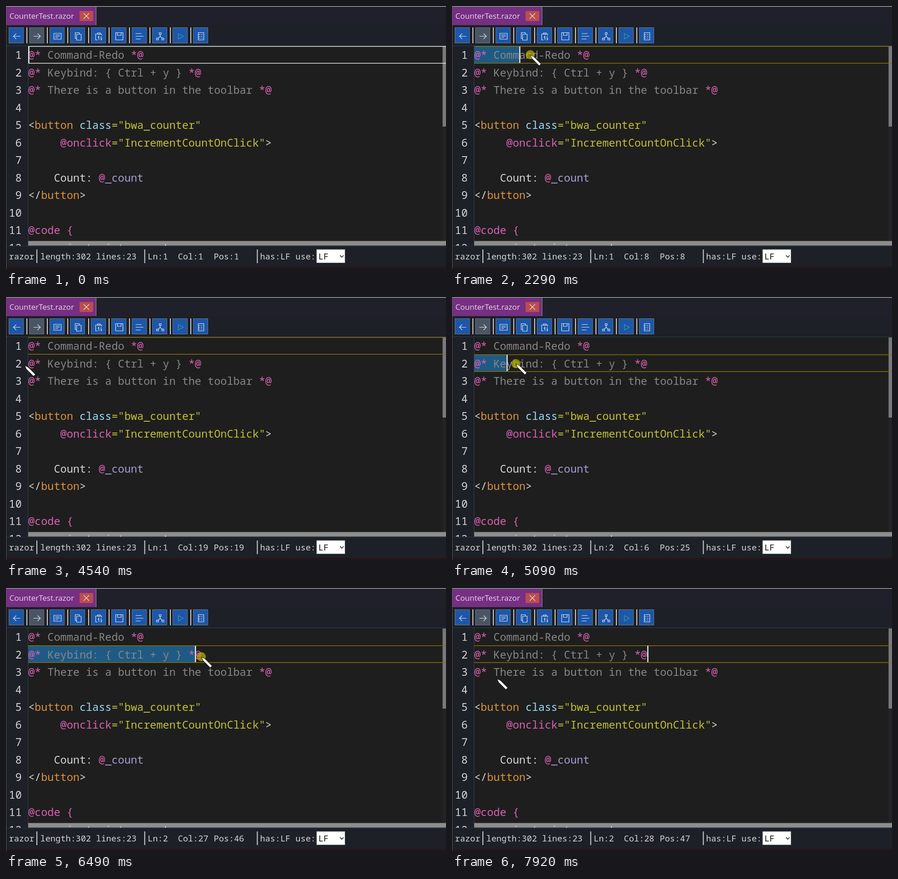
Animation, 969 px wide and 578 px high, one loop 7.99 s. Source, as an HTML page with a canvas:

```html
<!DOCTYPE html>
<html lang="en">
<head>
<meta charset="utf-8">
<title>Editor</title>
<style>
html, body { margin: 0; width: 100%; height: 100%; overflow: hidden; background: #1e1e1e; }
canvas { display: block; width: 969px; height: 578px; }
</style>
</head>
<body>
<canvas id="stage" width="969" height="578"></canvas>
<script>
const ctx = document.getElementById('stage').getContext('2d');
const LOOP = 7990, LEFT = 49, CHAR = 14.11, ROW = 38.5;
const MONO = '"Noto Sans Mono", "DejaVu Sans Mono", monospace';
const CODE_FONT = '23.52px ' + MONO;
const STATUS_FONT = '18.6px ' + MONO;
const TAB_FONT = '17.06px "Open Sans", "Noto Sans", sans-serif';
const PINK = '#da62b2', GRAY = '#878787', WHITE = '#d6d6d6',
      ORANGE = '#dc923e', SKY = '#9cdcfe', OLIVE = '#c3c136', LILAC = '#a99bd6';

// Each line: pairs of text and colour.
const comment = text => [['@*', PINK], [` ${text} `, GRAY], ['*@', PINK]];
const LINES = [
  comment('Command-Redo'),
  comment('Keybind: { Ctrl + y }'),
  comment('There is a button in the toolbar'),
  [],
  [['<', WHITE], ['button', ORANGE], [' class', SKY], ['="bwa_counter"', OLIVE]],
  [['     @onclick', PINK], ['="IncrementCountOnClick"', OLIVE], ['>', WHITE]],
  [],
  [['    Count: ', WHITE], ['@', PINK], ['_count', LILAC]],
  [['</', WHITE], ['button', ORANGE], ['>', WHITE]],
  [],
  [['@code {', PINK]],
  [['    private int', '#d8bd92'], [' _count;', WHITE]]
];
const lineLength = row => LINES[row].reduce((n, [s]) => n + s.length, 0);

// Moments of the two drags and the click after each.
const FIRST = { press: 1690, release: 3190, clear: 3390, lift: 3600 };
const SECOND = { press: 4690, release: 6900, clear: 7100, lift: 7240 };

// Pointer stops, joined by straight moves.
const STOPS = [
  { t: 390, x: 880, y: 562 }, { t: 1150, x: 110, y: 109 },
  { t: FIRST.press, x: 36, y: 108 }, { t: 1940, x: 36, y: 108 },
  { t: 2290, x: 172, y: 107 }, { t: 2850, x: 328, y: 116 },
  { t: FIRST.release, x: 342, y: 114 }, { t: 3670, x: 342, y: 114 },
  { t: 4300, x: 95, y: 165 }, { t: 4540, x: 41, y: 150 },
  { t: 4830, x: 40, y: 148 }, { t: 5560, x: 322, y: 144 },
  { t: 6490, x: 430, y: 151 }, { t: SECOND.release, x: 475, y: 152 },
  { t: SECOND.clear, x: 475, y: 152 }, { t: 7920, x: 99, y: 199 }
];

function pointerAt(t) {
  const i = STOPS.findIndex(s => s.t > t);
  if (i < 1) return i ? STOPS[STOPS.length - 1] : STOPS[0];
  const a = STOPS[i - 1], b = STOPS[i], k = (t - a.t) / (b.t - a.t);
  return { x: a.x + (b.x - a.x) * k, y: a.y + (b.y - a.y) * k };
}

// The caret trails the pointer during a drag and stays put afterwards.
function stateAt(t) {
  const drag = t < SECOND.press ? FIRST : SECOND;
  const row = drag === FIRST ? 0 : 1;
  const reach = pointerAt(Math.min(t, drag.release)).x - 69.5;
  const col = t < drag.press ? 0 : Math.max(0, Math.min(lineLength(row), Math.round(reach / CHAR)));
  const selecting = t >= drag.press && t < drag.clear;
  const pressed = t >= drag.press && t < drag.release || t >= drag.clear && t < drag.lift;
  const idle = t < FIRST.press ? t % 1000 >= 190 && t % 1000 < 690 : t > 3930 && t < SECOND.press;
  return { row, col, selecting, pressed, caret: !idle, clicked: t >= FIRST.press };
}

function rect(x, y, w, h, color) {
  ctx.fillStyle = color;
  ctx.fillRect(x, y, w, h);
}

function text(s, x, y, color, font) {
  ctx.font = font;
  ctx.fillStyle = color;
  ctx.fillText(s, x, y);
}

function line(...p) {
  ctx.moveTo(p[0], p[1]);
  for (let i = 2; i < p.length; i += 2) ctx.lineTo(p[i], p[i + 1]);
}

// Box centred on x, y.
const box = (x, y, w, h) => ctx.rect(x - w / 2, y - h / 2, w, h);

function bars(x, gap, ...widths) {
  widths.forEach((w, i) => line(x, (i - 1) * gap, x + w, (i - 1) * gap));
}

function arrow(dir) {
  line(-8, 0, 8, 0);
  line(dir, -6, dir * 7, 0, dir, 6);
}

const ICONS = [
  () => arrow(-1),
  () => arrow(1),
  () => { box(0, 0, 16, 13); bars(-5, 3, 10, 10, 6); },
  () => { box(2, 2, 10, 13); line(-3, 5, -6, 5, -6, -8, 3, -8, 3, -5); },
  () => {
    line(-3, 8, -7, 8, -7, -5, 6, -5, 6, -2);
    box(0, -6, 6, 3);
    line(0, 8, 0, 0, -2, 3);
    line(5, 0, 5, 8, 7, 5);
  },
  () => { box(0, 0, 16, 16); box(0, -5, 8, 6); },
  () => bars(-9, 6, 13, 17, 11),
  () => {
    line(-5, 5, 0, 0, 5, 5);
    line(0, 0, 0, -4);
    for (const x of [-6, 0, 6]) box(x, x ? 6 : -6, 4, 4);
  },
  () => line(-5, -6, 6, 0, -5, 6, -5, -6),
  () => { box(0, 0, 12, 16); bars(-6, 4, 4, 4, 4); bars(0, 4, 3, 3, 3); }
];

function strokeAt(x, y, color, shape, width = 1.2) {
  ctx.save();
  ctx.translate(x, y);
  ctx.strokeStyle = color;
  ctx.lineWidth = width;
  ctx.beginPath();
  shape();
  ctx.stroke();
  ctx.restore();
}

function drawHeader() {
  rect(0, 0, 969, 43, '#1f2029');
  rect(0, 43, 969, 45, '#1d2027');
  rect(1, 2, 197, 40, '#762f82');
  rect(198, 2, 1, 40, '#a08ba5');
  text('CounterTest.razor', 7.5, 28, '#e6d8e9', TAB_FONT);
  rect(162, 11, 30, 22, '#b94e4e');
  strokeAt(177, 22, '#f0e4e4', () => { line(-6, -6, 6, 6); line(6, -6, -6, 6); });
  ICONS.forEach((icon, i) => {
    const x = Math.round(23 + 45.15 * i);
    const disabled = i === 1;
    rect(x - 17, 47, 33, 35, disabled ? '#65707c' : '#767676');
    rect(x - 16, 48, 31, 33, disabled ? '#4a5564' : '#1c57a9');
    strokeAt(x + .5, 66.5, i === 8 ? '#3f9c9c' : '#e2e8ef', icon);
    if (i) rect(x - 23, 47, 2, 35, '#d2d2d2');
  });
  rect(0, 87, 969, 1, '#2b414e');
}

function drawCode() {
  ctx.save();
  ctx.beginPath();
  ctx.rect(0, 88, 969, 439);
  ctx.clip();
  LINES.forEach((parts, n) => {
    const y = 116 + n * ROW;
    const label = String(n + 1);
    text(label, 34.5 - label.length * CHAR, y, WHITE, CODE_FONT);
    let x = LEFT;
    for (const [s, color] of parts) {
      text(s, x, y, color, CODE_FONT);
      x += s.length * CHAR;
    }
  });
  ctx.restore();
}

function drawEditor({ row, col, selecting, caret, clicked }) {
  rect(0, 88, 969, 439, '#1e1e1e');
  rect(0, 88, 48, 439, '#1d2027');
  rect(48, 88, 1, 439, '#2b4656');
  rect(961.5, 89, 7.5, 428, '#242424');
  rect(961.5, 89, 7.5, 176, '#797979');
  rect(LEFT, 516.5, 920, 10, '#8d8d8d');

  const top = 89 + row * 38;
  const edge = clicked ? '#8b7208' : '#e4e4e4';
  if (selecting) rect(LEFT, top, col * CHAR, 36, '#1f5a84');
  for (const y of [top - 1, top + 36]) rect(LEFT, y, 920, 1.5, edge);
  drawCode();
  if (caret) rect(Math.round(LEFT + col * CHAR), top, 2.5, 36, '#ececec');
}

function drawStatus({ row, col }) {
  const put = (s, x, color = WHITE) => text(s, x, 556.5, color, STATUS_FONT);
  rect(0, 527, 969, 51, '#1d2127');
  rect(0, 527, 969, 1, '#26343e');
  rect(0, 573.5, 969, 4.5, '#24151a');
  put('razor', 6.5);
  put('length:302 lines:23', 75.5);
  put('Ln:' + (row + 1), 312);
  put('Col:' + (col + 1), 378.5);
  put('Pos:' + (row * (lineLength(0) + 1) + col + 1), 457.5);
  put('has:LF use:', 559.5);
  for (const x of [67, 304.5, 552.5]) rect(x, 535, 2, 30, '#d2d2d2');
  rect(683.5, 534.5, 63.5, 30.5, '#767676');
  rect(684.5, 535.5, 61.5, 28.5, '#ffffff');
  put('LF', 688, '#111111');
  strokeAt(739.5, 550, '#222222', () => line(-4, -2, 0, 2, 4, -2), 1.7);
}

function drawPointer({ x, y }, pressed) {
  if (pressed) {
    ctx.fillStyle = 'rgba(190, 180, 0, .7)';
    ctx.beginPath();
    ctx.arc(x, y, 10, 0, Math.PI * 2);
    ctx.fill();
  }
  ctx.save();
  ctx.translate(x + 1, y + 1.5);
  ctx.rotate(Math.PI / 4);
  ctx.beginPath();
  line(0, 0, 7, -2.5, 29, -2.5, 29, 2.5, 7, 2.5);
  ctx.closePath();
  ctx.lineWidth = 1.5;
  ctx.strokeStyle = '#111111';
  ctx.stroke();
  ctx.fillStyle = '#ffffff';
  ctx.fill();
  ctx.restore();
}

function draw(t) {
  const state = stateAt(t);
  drawHeader();
  drawEditor(state);
  drawStatus(state);
  rect(0, 0, 969, 1.5, '#a9a9a9');
  rect(0, 0, 1, 578, '#5c5c60');
  if (t >= STOPS[0].t) drawPointer(pointerAt(t), state.pressed);
}

const start = performance.now();
function loop() {
  draw((performance.now() - start) % LOOP);
  requestAnimationFrame(loop);
}
loop();
</script>
</body>
</html>
```
